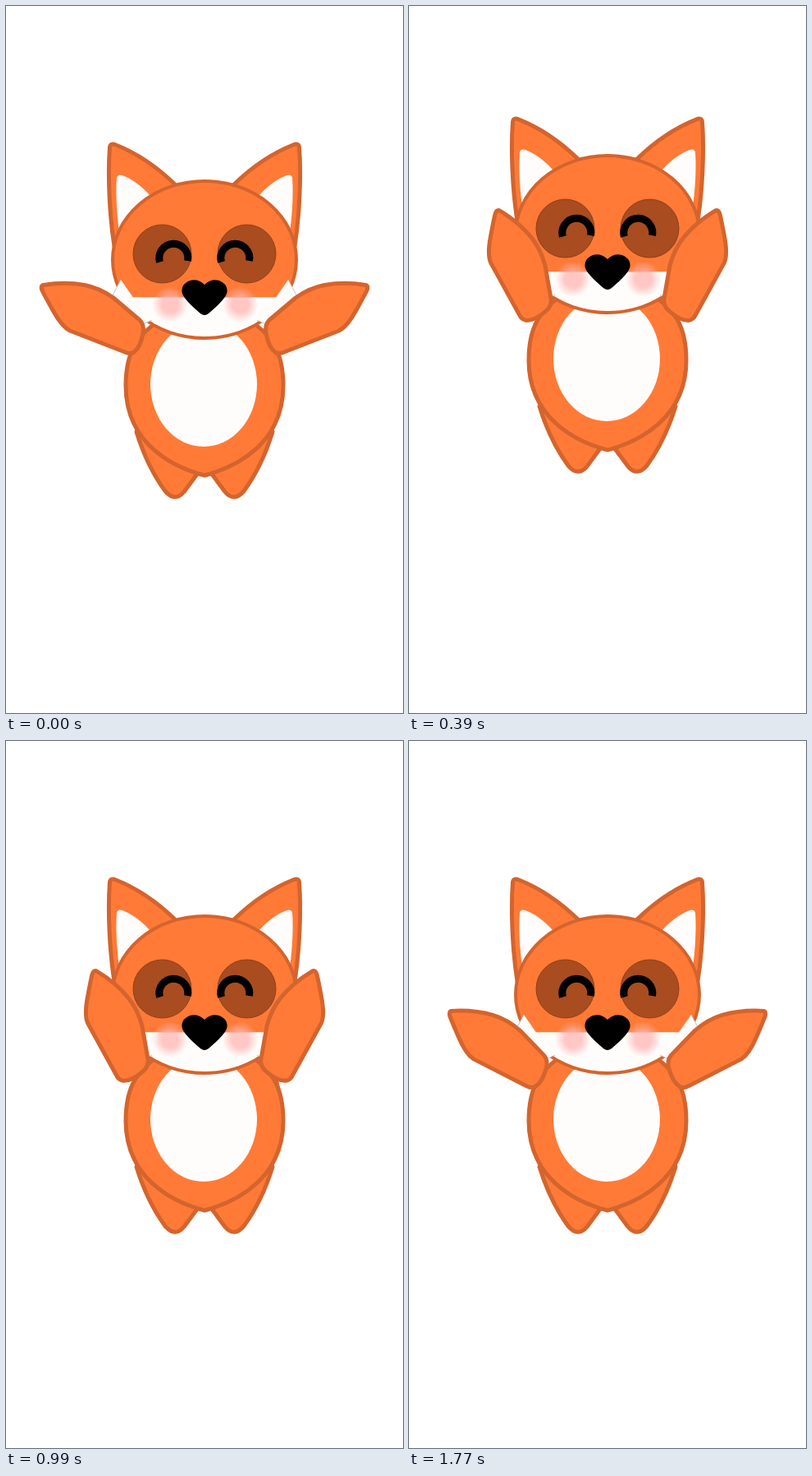
Write an HTML page that moves like this. It is 484 by 860 pixels and loops after 1800 ms.

```html
<!DOCTYPE html>
<html lang="en">
<head>
<meta charset="utf-8">
<title>Jumping fox</title>
<style>
html, body { margin: 0; width: 100%; height: 100%; overflow: hidden; background: #fff; }
svg { display: block; width: 484px; height: 860px; }
.fur { fill: #ff7a36; stroke: #d4642e; stroke-width: 4; stroke-linejoin: round; }
.thick { stroke-width: 5; }
.thin { stroke-width: 2.5; }
.white { fill: #fffdfb; }
.patch { fill: #a94c20; stroke: #8c401c; }
.eye { fill: none; stroke: #000; stroke-width: 9; }
</style>
</head>
<body>
<svg viewBox="0 0 484 860">
  <defs>
    <radialGradient id="blush">
      <stop offset=".45" stop-color="#ffb4b2" stop-opacity=".75"/>
      <stop offset="1" stop-color="#ffb4b2" stop-opacity="0"/>
    </radialGradient>
    <clipPath id="chin"><path d="M100 354.5H384V420H100Z"/></clipPath>
  </defs>

  <g id="legs">
    <path id="leg" class="fur thick" d="M159 518Q172 560 194 590Q206 604 217 591L240 560Z"/>
    <use href="#leg" transform="translate(484) scale(-1 1)"/>
  </g>

  <g id="fox">
    <g id="tail">
      <path class="fur thin" d="M104 391C95 440 96 472 110 496C122 517 145 533 165 540L200 546V500L160 458Z"/>
      <path class="white" d="M105 394L137 432L100 445Q100 420 105 394Z"/>
    </g>

    <path class="fur thick" d="M242 571C200 560 146 530 146 462C146 420 160 400 190 380H294C324 400 338 420 338 462C338 530 284 560 242 571Z"/>
    <ellipse class="white" cx="241" cy="460" rx="65" ry="76"/>

    <g id="ear">
      <path class="fur thick" d="M132 292C126 255 124 205 126.500 172Q127 166 134 169Q172 184 206 217L200 290Z"/>
      <path class="white" d="M138 275C134 245 134 222 135 209Q136 204 142 206Q165 215 184 241Z"/>
    </g>
    <use href="#ear" transform="translate(484) scale(-1 1)"/>

    <ellipse class="fur" cx="242" cy="308.500" rx="112" ry="95.500"/>
    <ellipse class="white" cx="242" cy="308.500" rx="110" ry="93.500" clip-path="url(#chin)"/>

    <g id="fluff">
      <path class="white" d="M140 333L119 372L133 370L131 388L152 383L163 389L178 382L186 354.500H155Z"/>
      <path fill="none" stroke="#c8c4c1" d="M140 333L119 372L133 370L131 388L152 383L163 389L178 382"/>
    </g>
    <use href="#fluff" transform="translate(484) scale(-1 1)"/>

    <g id="eye">
      <circle class="patch" cx="190.500" cy="301.500" r="35.500"/>
      <path class="eye" d="M187.500 311.500A17.500 17.500 0 1 1 221.500 310"/>
    </g>
    <circle class="patch" cx="293.500" cy="301.500" r="35.500"/>
    <path class="eye" d="M262.500 311.500A17.500 17.500 0 1 1 296.500 310"/>

    <circle cx="200" cy="363" r="22" fill="url(#blush)"/>
    <circle cx="285.500" cy="363" r="22" fill="url(#blush)"/>
    <path d="M242 339Q250 331 260 334Q272 339 269 350Q266 358 247 374Q242 378 237 374Q218 358 215 350Q212 339 224 334Q234 331 242 339Z"/>

    <g id="sleeve">
      <path id="arm" class="fur thick" d="M45 339.500Q72 335 96 339.500Q114 343 131 355L163 382Q169 388 167 398Q164 415 156 421Q151 424 145 421L78 395Q68 390 57 370Q48 354 44 346Q42 341 45 339.500Z"/>
    </g>
    <use href="#sleeve" transform="translate(484) scale(-1 1)"/>
  </g>
</svg>
<script>
const LOOP = 1800, STEP = 30;
const move = (id, transform) => document.getElementById(id).setAttribute("transform", transform);
const wave = p => 0.5 - 0.5 * Math.cos(Math.PI * p);

// Height offset of the body: crouch, leap, land
function lift(t) {
  if (t < 270) return 20 * Math.sin(Math.PI / 2 * t / 270);
  if (t < 405) return 20 - 52.5 * wave((t - 270) / 135);
  if (t < 540) return -32.5 * (1 - ((t - 405) / 135) ** 2);
  return 0;
}

function draw(t) {
  const y = lift(t);
  move("fox", `translate(0 ${y})`);
  move("legs", `translate(0 ${y > 0 ? y * 0.15 : y})`);

  const raise = 1 - Math.abs(t % 600 - 300) / 300;
  move("arm", `rotate(${57 * raise} 160 399)`);

  // The tail folds behind the body while it changes sides
  const phase = t % 900;
  const swing = 225 - Math.abs(phase % 450 - 225);
  const side = (phase < 450 ? -1 : 1) * Math.min(1, swing / 120);
  move("tail", `translate(242) scale(${side} 1) translate(-242) rotate(${(150 - swing) * 0.28} 195 510)`);
}

function tick() {
  draw(Math.floor(performance.now() % LOOP / STEP) * STEP);
  requestAnimationFrame(tick);
}
tick();
</script>
</body>
</html>
```
